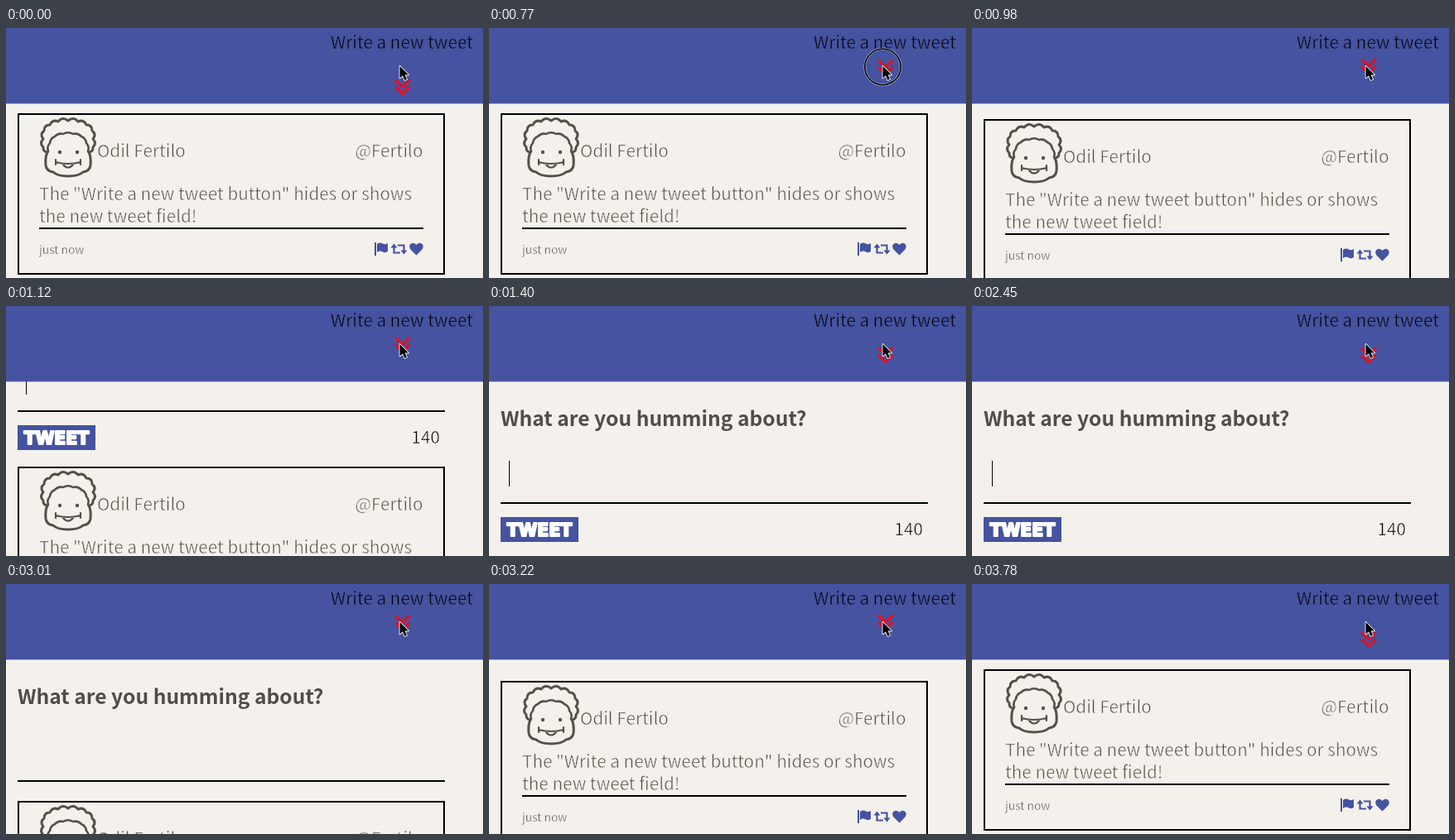
Recreate the animation shown at these times as an HTML page with a canvas. Size 576 px wide and 302 px high, loop 3850 ms.

```html
<!DOCTYPE html>
<html lang="en">
<head>
<meta charset="utf-8">
<title>Compose toggle</title>
<style>
html, body { margin: 0; width: 100%; height: 100%; overflow: hidden; background: #f4f1ec; }
canvas { display: block; width: 576px; height: 302px; }
</style>
</head>
<body>
<canvas id="stage"></canvas>
<script>
const W = 576, H = 302, LOOP = 3850, STEP = 70;
const BLUE = '#4553a0', PAPER = '#f4f1ec', INK = '#545149', RED = '#e3101f';
const HEADER_H = 91.4, FORM_TOP = 91, FORM_H = 202;
const SANS = '"Noto Sans CJK JP", "Noto Sans CJK SC", "Noto Sans", sans-serif';
const BODY = 20.7, SMALL = 13.8;

const canvas = document.getElementById('stage');
const ctx = canvas.getContext('2d');
const ratio = window.devicePixelRatio || 1;
canvas.width = W * ratio;
canvas.height = H * ratio;

const clamp = x => Math.min(1, Math.max(0, x));
const swing = x => 0.5 - Math.cos(Math.PI * clamp(x)) / 2;

// cubic-bezier(.25, .1, .25, 1)
function ease(x) {
  const bezier = (a, b, u) => 3 * a * u * (1 - u) ** 2 + 3 * b * u * u * (1 - u) + u ** 3;
  let lo = 0, hi = 1;
  for (let i = 0; i < 24; i++) {
    const mid = (lo + hi) / 2;
    if (bezier(0.25, 0.25, mid) < x) lo = mid; else hi = mid;
  }
  return bezier(0.1, 1, lo);
}

// A thin outline in the ground colour trims the regular weight to a light one.
function lightText(str, x, y, size, color, align = 'left', ground = PAPER) {
  ctx.font = `400 ${size}px ${SANS}`;
  ctx.textAlign = align;
  ctx.lineJoin = 'round';
  ctx.fillStyle = color;
  ctx.strokeStyle = ground;
  ctx.lineWidth = size * 0.029;
  ctx.fillText(str, x, y);
  ctx.strokeText(str, x, y);
}

function rect(x, y, w, h, color) {
  ctx.fillStyle = color;
  ctx.fillRect(x, y, w, h);
}

function stroke(path, color, width, join = 'miter') {
  ctx.strokeStyle = color;
  ctx.lineWidth = width;
  ctx.lineJoin = join;
  ctx.lineCap = join === 'round' ? 'round' : 'butt';
  ctx.stroke(new Path2D(path));
}

function fill(path, color) {
  ctx.fillStyle = color;
  ctx.fill(new Path2D(path));
}

// Joins points with curves that bulge to the left of the direction of travel.
function scallops(points, bulge) {
  let d = `M${points[0]}`;
  for (let i = 1; i < points.length; i++) {
    const [x0, y0] = points[i - 1], [x1, y1] = points[i];
    const cx = (x0 + x1) / 2 + (y1 - y0) * bulge;
    const cy = (y0 + y1) / 2 - (x1 - x0) * bulge;
    d += `Q${cx} ${cy} ${x1} ${y1}`;
  }
  return d;
}

function drawAvatar() {
  const hair = [[50, 150], [45, 144], [45, 134], [46, 124], [53, 117], [63, 113],
    [75, 112], [87, 113], [97, 117], [104, 124], [105, 134], [105, 144], [100, 150]];
  const fringe = [[51, 149], [53, 139], [59, 131], [69, 128], [81, 128], [91, 131], [97, 139], [99, 149]];
  const jaw = 'M50 150Q47 156 48 166Q49 173 57 174Q62 179 75 179Q88 179 93 174Q101 173 102 166Q103 156 100 150';
  stroke(scallops(hair, 0.5), INK, 3, 'round');
  stroke(scallops(fringe, 0.3), INK, 2.6, 'round');
  stroke(jaw, INK, 3, 'round');
  stroke('M60 159V165M90 159V165M60 162Q67 164 75 164Q83 164 90 162M69 165Q75 172 81 165', INK, 2.2, 'round');
  for (const x of [65, 86]) {
    ctx.beginPath();
    ctx.arc(x, 150, 2.2, 0, Math.PI * 2);
    ctx.fillStyle = INK;
    ctx.fill();
  }
}

function drawIcons() {
  rect(445, 259, 2, 16, BLUE);
  fill('M448 261Q452 258.5 455 260.5Q458 262 461 260V270Q458 272 455 270.5Q452 268.5 448 271Z', BLUE);
  stroke('M468.5 264V271.5H476M480.5 270V262.5H473', BLUE, 2.2);
  fill('M464.5 265.5L468.5 260.5L472.5 265.5ZM476.5 268.5H484.5L480.5 273.5Z', BLUE);
  fill('M495.5 274.5L488.5 267.5C484.5 262 491 256.5 495.5 262C500 256.5 506.5 262 502.5 267.5Z', BLUE);
}

function drawCard(offset) {
  ctx.save();
  ctx.translate(0, offset);
  stroke('M15 104H529V297H15Z', '#000', 2);
  drawAvatar();
  lightText('Odil Fertilo', 110, 156, BODY, INK);
  lightText('@Fertilo', 503.5, 156, BODY, INK, 'right');
  lightText('The "Write a new tweet button" hides or shows', 40, 208, BODY, INK);
  lightText('the new tweet field!', 40, 235, BODY, INK);
  rect(40, 241, 464, 2, '#000');
  lightText('just now', 40, 273, SMALL, INK);
  drawIcons();
  ctx.restore();
}

function drawForm(offset, clipBottom, caret) {
  ctx.save();
  ctx.beginPath();
  ctx.rect(0, FORM_TOP, W, clipBottom - FORM_TOP);
  ctx.clip();
  ctx.translate(0, offset);
  ctx.font = `700 24.6px ${SANS}`;
  ctx.textAlign = 'left';
  ctx.fillStyle = '#504e49';
  ctx.fillText('What are you humming about?', 14, 145);
  if (caret) rect(24, 187, 1, 31, '#000');
  rect(14, 237, 516, 2, '#000');
  lightText('140', 524, 277, BODY, '#000', 'right');

  rect(14, 255, 94, 30, BLUE);
  ctx.font = 'bold 20.5px "DejaVu Sans", sans-serif';
  ctx.textAlign = 'center';
  ctx.fillStyle = ctx.strokeStyle = '#fff';
  ctx.lineWidth = 2.2;
  ctx.strokeText('TWEET', 61, 277.6);
  ctx.fillText('TWEET', 61, 277.6);
  ctx.restore();
}

function drawChevrons(t) {
  const half = 1070;
  const phase = (t - 10 + 2 * half) % (2 * half);
  const leg = ease((phase % half) / half);
  const top = phase < half ? 61 - 25 * leg : 36 + 25 * leg;
  for (const y of [top + 1.5, top + 10]) {
    stroke(`M470 ${y}l8.8 8.5l8.8 -8.5`, RED, 3.2);
  }
}

function drawPointer(pressed) {
  if (pressed) {
    for (const [color, width] of [['rgba(255,255,255,.45)', 3], ['#000', 1.5]]) {
      ctx.beginPath();
      ctx.arc(475.5, 47, 21.7, 0, Math.PI * 2);
      ctx.strokeStyle = color;
      ctx.lineWidth = width;
      ctx.stroke();
    }
  }
  const arrow = 'M475.5 46V60.5L479 57.5L481.5 63L484 62L481.7 56.6H486Z';
  stroke(arrow, '#fff', 1.7, 'round');
  fill(arrow, '#000');
}

const within = (t, from, to) => t >= from && t < to;

function draw(t) {
  ctx.setTransform(ratio, 0, 0, ratio, 0, 0);
  rect(0, 0, W, H, PAPER);

  const closing = t >= 2888;
  const shown = Math.round(FORM_H * (swing((t - 933) / 400) - swing((t - 2888) / 400)));
  const caret = within(t, 940, 1460) || within(t, 1960, 2460);
  drawCard(shown);
  // Focus keeps the lower end in view while opening; closing clips from below.
  if (shown > 0) drawForm(closing ? 0 : shown - FORM_H, FORM_TOP + shown, caret);

  rect(0, 0, W, HEADER_H, BLUE);
  lightText('Write a new tweet', 564, 25, BODY, '#000', 'right', BLUE);
  drawChevrons(t);
  drawPointer(within(t, 700, 910) || within(t, 2660, 2870));
}

const start = performance.now();
function tick() {
  const t = (performance.now() - start) % LOOP;
  draw(Math.floor(t / STEP) * STEP);
  requestAnimationFrame(tick);
}
tick();
</script>
</body>
</html>
```
